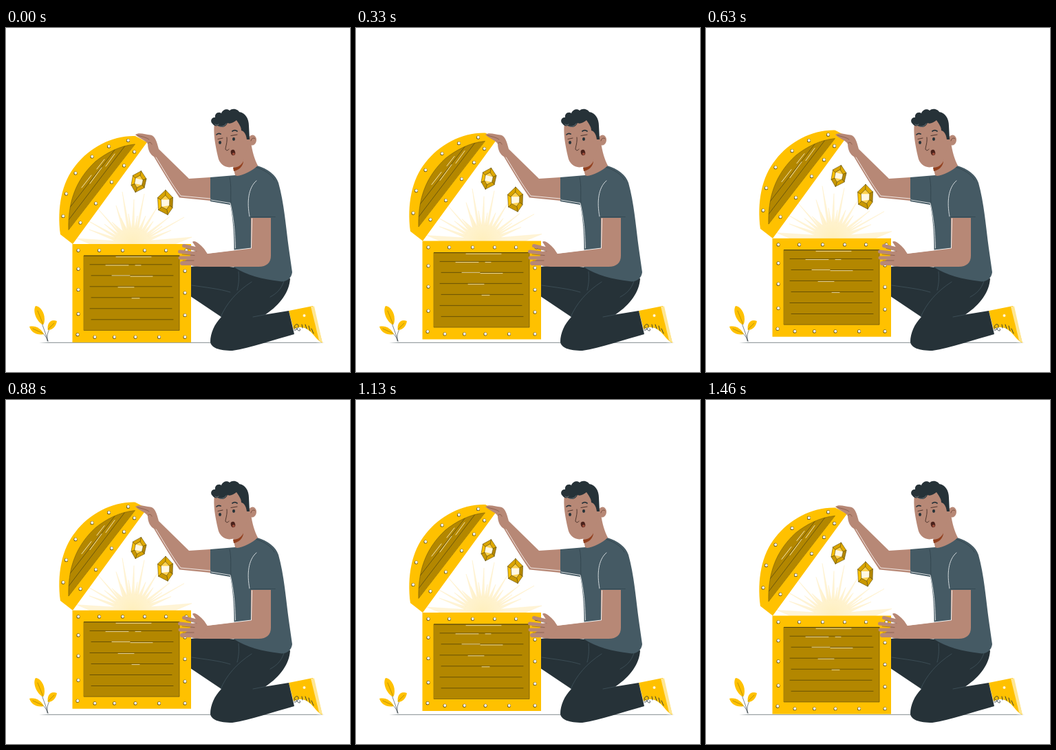
Recreate the animation shown at these times as an HTML page with a canvas. Size 500 by 500 pixels, loop 1500 ms.

```html
<!DOCTYPE html>
<html lang="en">
<head>
<meta charset="utf-8">
<title>Treasure chest</title>
<style>
html, body { margin: 0; width: 100%; height: 100%; overflow: hidden; background: #fff; }
canvas { display: block; width: 100vw; height: 100vh; }
</style>
</head>
<body>
<canvas id="stage" width="500" height="500"></canvas>
<script>
const ctx = document.getElementById('stage').getContext('2d');
const GOLD = '#ffc100', BRONZE = '#b38700', INK = '#263238', SHIRT = '#455a64',
      SKIN = '#b78876', PALE = '#fff0c0';
const LOOP = 1500, FPS = 24, RISE = 10;

ctx.lineCap = ctx.lineJoin = 'round';

function fill(d, color) {
  ctx.fillStyle = color;
  ctx.fill(new Path2D(d));
}
function line(d, color = INK, width = 0.7) {
  ctx.strokeStyle = color;
  ctx.lineWidth = width;
  ctx.stroke(new Path2D(d));
}
function oval(x, y, rx, ry, color, turn = 0) {
  ctx.beginPath();
  ctx.ellipse(x, y, rx, ry, turn, 0, 7);
  ctx.fillStyle = color;
  ctx.fill();
}
function rivet(x, y) {
  oval(x, y, 2.5, 2.6, '#5b4a14');
  oval(x + 0.2, y - 0.2, 2, 2.1, '#f3f3ee');
}
const poly = points => 'M' + points.map(p => p.join(' ')).join('L') + 'Z';

function ground() {
  fill('M48 457.3 L62 456.7 H450 L463 457.3 L450 457.9 H62Z', '#9aa2a5');
}

function plant() {
  line('M49 420 C53 433 58 444 61 455 M47 440 C54 442 58 448 61 455 M69 430 C61 438 59 446 60 455', INK, 0.6);
  fill('M43 404 C50 404 56 414 56 423 C56 428 55 431 53 431 C45 427 38 412 43 404Z', GOLD);
  fill('M34 434 C43 432 51 437 55 445 C45 447 37 443 34 434Z', GOLD);
  fill('M74 426 C64 422 59 431 61 439 C68 439 73 433 74 426Z', GOLD);
  line('M46 411 L54 431 M39 437 L54 444 M70 429 L61 438', '#7d6414', 0.5);
}

function legs() {
  fill('M411 411 L446 404 L460 458 C452 454 448 446 442 441 C435 434 426 433 418 438Z', GOLD);
  fill('M443 405 L448 404.5 L460 458 L455 454Z', '#ffe692');
  oval(433.5, 418, 2, 2, '#fff6d8');
  line('M419 437 C418 430 425 429 425 433 C425 437 421 440 419 439 M421 435 C425 442 429 441 427 437'
    + ' M430 431 L431 436 M435 431 L437 437 M440 433 L442 440 M444 437 L447 444', INK, 0.9);
  fill('M269 347 C291 344 315 346 334 348 L413 364 C412 383 399 402 377 416.5 L411 411 L419 445'
    + ' C390 453 355 465 329 469 C310 469 298 465 297 456 C297 444 303 430 313 420 L269 390.5Z', INK);
  line('M357 369 C335 383 320 401 312 420 M338 354 C339 366 338 374 336 381 M404 368 C400 380 393 386 384 391'
    + ' M377 416.5 L359 420 M270 374 C290 377 310 379 326 384', '#4b5f69', 0.6);
}

function torso() {
  fill('M297 217 L333 214 C345 211 356 205 365 200 C381 205 392 213 396 225 C404 253 407 290 411 320'
    + ' L416 355 C415 364 407 370 397 368 C373 365 350 360 330.5 347 C333 320 331 282 326 257 L297 252Z', SHIRT);
  line('M325 217 C328 229 326 244 327 256 M363 202 C377 207 386 213 390 221', '#2d3e47', 0.7);
  line('M298 250 L326 254.5 C330 272 332.5 290 333.5 320', '#fff', 0.8);
  line('M364 222 C352 232 350 253 354 274', '#dfe5e7', 0.9);
  line('M355 274.5 H391', '#263a43', 0.9);
}

function head() {
  fill('M329 196 L333 214 C337 218 358 208 366 200 C361 190 358 180 356 166 L341 166Z', SKIN);
  fill('M330 203 C337 203 343 199 345 193 C345 201 338 207 331 208Z', '#92401f');
  oval(358, 163, 6, 7.5, SKIN, 0.15);
  line('M356 164 C357 160 360 159 362 161', '#5d3427', 0.7);
  fill('M303 137 C301 154 304 169 308 187 C310 198 319 204 328 202 C337 201 345 195 347 189'
    + ' L353 165 L350 137 L330 128Z', SKIN);
  fill('M300 139 C296 135 299 129 304 130 C303 124 309 121 313 124 C315 118 322 117 325 120'
    + ' C329 116 337 118 339 122 C348 123 353 132 353 142 L354 162 L350 162 C349 154 346 150 342 149'
    + ' C342 143 338 139 335 134 C331 137 326 140 322 138 C320 144 312 146 308 142 C305 143 302 142 300 139Z', INK);
  line('M304 140 C306 142 307 141 309 140 M310 143 C315 144 318 142 320 139', '#b9bfc2', 0.5);
  line('M306 155 C308 153 310 153 312 154 M329 150 C331 148.5 334 148.5 336 150', INK, 1.7);
  line('M308 161.5 L315 160 M327 156.5 L336 155 M321 159 C322 166 319 173 319 176 C320 179 323 178 324 176', '#34201b', 0.8);
  oval(311, 166.5, 2, 2.4, INK);
  oval(331, 161.5, 2, 2.4, INK);
  oval(330, 181, 3.2, 4.2, '#4a221b', -0.25);
  oval(330.8, 183, 1.9, 1.7, '#a4503c');
}

function lidArm() {
  fill('M188 155 C193 151 203 155 210 155.5 C217 157 219 165 222 176 L266 219 L297 217 V251 L252 246.5'
    + ' C239 227 226 206 215 187 C210 184 206 178 206 168 C202 163 193 160 188 155Z', SKIN);
  line('M191 156 C198 158 204 159 208 162 M206 168 C208 165 211 166 212 169', '#70483a', 0.6);
  line('M218 188 C230 207 242 229 254 244 L297 248', '#fff', 0.8);
}

function restingArm() {
  fill('M356 275 H391 L385 276 V331 C385 341 379 347 367 347 L283 347 C272 347 263 344 258 340'
    + ' C263 337 268 332 270 327 L292 328 L356 320Z', SKIN);
  fill('M391 274.5 H354 L355 276 H391Z', SHIRT);
  fill('M271 311 C274 307 283 315 288 321 L294 330 L285 343 L270 340 L268 326 L279 323Z', SKIN);
  line('M258.5 316.5 L281 322', SKIN, 5);
  line('M252.5 325 L274 327.5', SKIN, 5);
  line('M253 334 L272 334', SKIN, 5);
  line('M256 342 L278 342', SKIN, 6);
  line('M262 320.5 L277 324 M256 329 L274 330.5 M257 338 L273 338', '#70483a', 0.6);
  line('M357.5 277 L356.5 320 L293 327.5', '#fff', 0.9);
}

function rays() {
  const tips = [[103, 306], [121, 293], [119, 280], [143, 285], [133, 262], [154, 282], [160, 258], [167, 276],
    [169, 238], [178, 270], [186, 249], [191, 273], [201, 241], [203, 273], [220, 260], [214, 281],
    [238, 274], [227, 288], [259, 275], [240, 294], [270, 304]];
  const cx = 184, cy = 314;
  const angleOf = ([x, y]) => Math.atan2(y - cy, x - cx);
  const points = [[cx - 62, cy]];
  tips.forEach((tip, i) => {
    points.push(tip);
    if (i < tips.length - 1) {
      const a = (angleOf(tip) + angleOf(tips[i + 1])) / 2;
      points.push([cx + 26 * Math.cos(a), cy + 22 * Math.sin(a)]);
    }
  });
  points.push([cx + 62, cy]);
  const outline = poly(points);
  fill(outline, '#fff4d6');
  line(outline, '#ffeec0', 0.4);
  const glow = ctx.createRadialGradient(cx, cy, 2, cx, cy, 36);
  glow.addColorStop(0, 'rgba(255,239,188,.9)');
  glow.addColorStop(1, 'rgba(255,239,188,0)');
  fill(outline, glow);
}

function gem(cx, cy, corners) {
  const shades = ['#e0aa00', '#b38700', '#d9a400', '#c99700', '#ffc100', '#d9a400'];
  const outer = corners.map(([x, y]) => [cx + x, cy + y]);
  const inner = corners.map(([x, y]) => [cx + x * 0.56, cy + y * 0.56]);
  outer.forEach((p, i) => {
    const j = (i + 1) % 6;
    const facet = poly([p, outer[j], inner[j], inner[i]]);
    fill(facet, shades[i]);
    line(facet, '#5c4908', 0.6);
  });
  fill(poly(inner), '#ffd250');
  fill(poly([inner[1], inner[2], inner[4], inner[5]]), '#fff8e4');
  line(poly(inner), '#5c4908', 0.5);
}

function lid() {
  fill('M97 314 L79 300 C74 262 81 224 101 200 C122 173 155 156 188 157 L205 166Z', GOLD);
  const edge = 'M91 293 C90 255 100 222 130 194 C145 182 165 171 187 169Z';
  ctx.save();
  ctx.clip(new Path2D(edge));
  fill(edge, BRONZE);
  line('M92 262 L162 172 M91 279 L174 170', '#4e4312', 0.7);
  line('M122 226 L139 203 M110 232 L124 214 M145 201 L158 183 M132 205 L143 191', PALE, 0.9);
  ctx.restore();
  line(edge, '#65500d', 0.6);
  [[83, 273.5], [87.5, 241], [101, 211], [125, 187], [149.5, 172], [177.5, 163.5],
   [108, 283], [130.5, 255], [153.5, 224], [171.5, 200], [186.5, 180]].forEach(p => rivet(...p));
}

function box() {
  fill('M96.5 314 H269 V457 H96.5Z', GOLD);
  fill('M113.5 331 H252 V439.5 H113.5Z', BRONZE);
  line('M113.5 331 H252 V439.5 H113.5Z', '#6b5510', 0.7);
  line('M113.5 331 H252', '#3e360f', 0.8);
  for (let i = 0; i < 6; i++) {
    const y = 343.8 + i * 16, x = i % 2 ? 124 : 122;
    line(`M${x} ${y} H${x + 119}`, '#554507', 0.8);
  }
  line('M160 332.7 H211 M145 344.9 H178 M188 344.9 H196 M181 361 H213 M154 359.8 H180'
    + ' M163 376.8 H186 M183 392.8 H194', PALE, 0.8);
  [105, 135.5, 169.5, 201.5, 232.5, 262].forEach(x => rivet(x, 323.3));
  [129, 157.5, 188, 222.5].forEach(x => rivet(x, 449.3));
  [350.3, 380.5, 415.7, 445.7].forEach((y, i) => rivet(i === 3 ? 104 : 105, y));
  [353.3, 385, 417.5, 449.3].forEach(y => rivet(260, y));
}

function chest(lift) {
  ctx.save();
  ctx.translate(0, -lift);
  rays();
  lid();
  gem(193, 223.3, [[3.5, -15.5], [11, -4], [8, 9], [-5, 15.5], [-11, 5], [-8.5, -9]]);
  gem(231.5, 253.5, [[0.5, -18], [11, -7], [10.5, 8], [3.5, 18], [-10, 11], [-11, -7]]);
  box();
  ctx.restore();
}

// The chest rises and falls at a constant speed, in steps of the frame rate.
function liftAt(ms) {
  const step = Math.floor((ms % LOOP + 4) * FPS / 1000);
  const phase = step / FPS * 1000 / LOOP % 1;
  return RISE * (1 - Math.abs(1 - 2 * phase));
}

function draw(ms) {
  ctx.fillStyle = '#fff';
  ctx.fillRect(0, 0, 500, 500);
  ground();
  plant();
  legs();
  torso();
  head();
  chest(liftAt(ms));
  lidArm();
  restingArm();
}

let start;
function tick(now) {
  start ??= now;
  draw(Math.max(0, now - start));
  requestAnimationFrame(tick);
}
draw(0);
requestAnimationFrame(tick);
</script>
</body>
</html>
```
